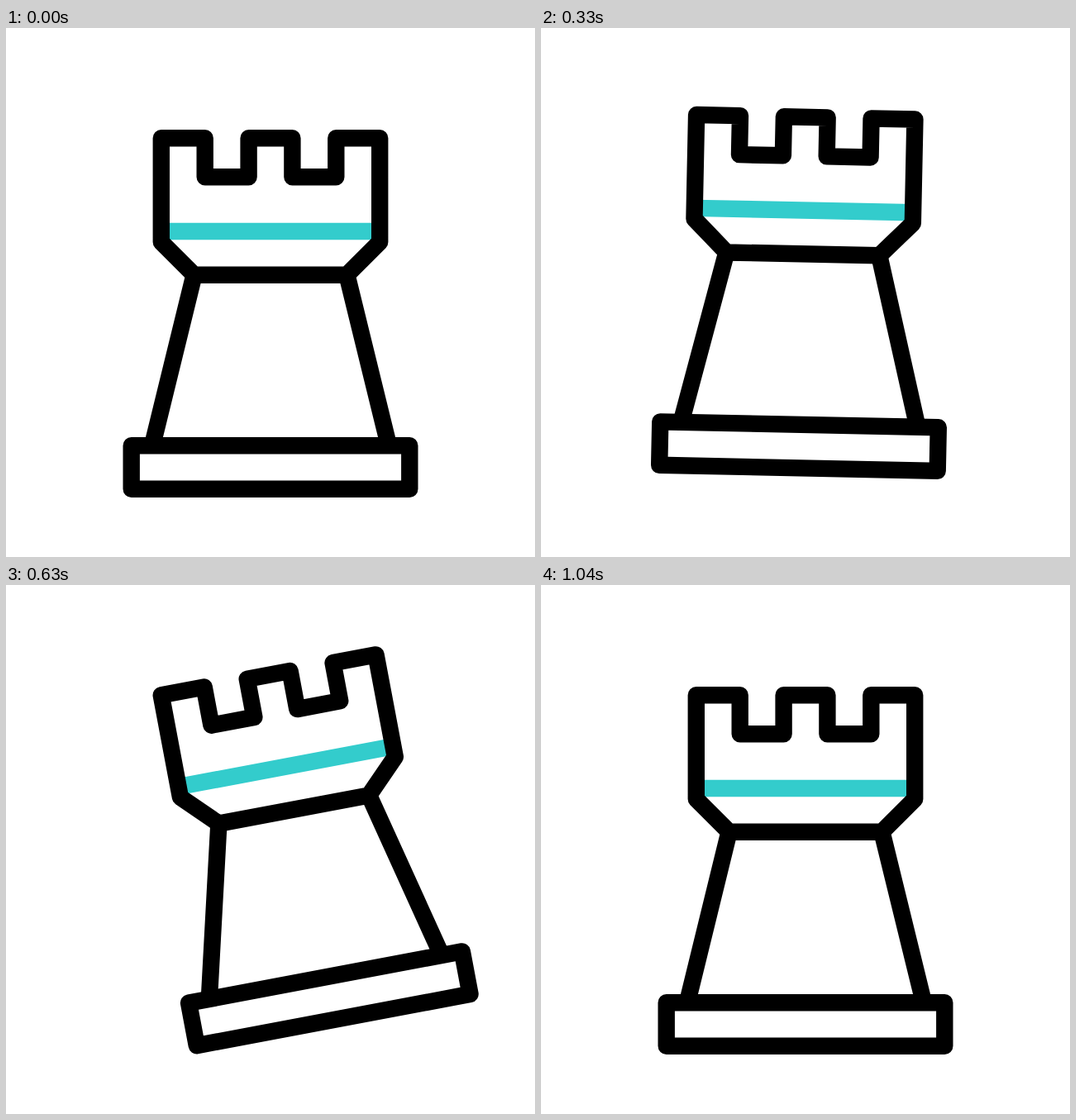
Animation of 640x640 px, one loop 1540 ms. Source, as an HTML page:

```html
<!DOCTYPE html>
<html lang="en">
<head>
<meta charset="utf-8">
<title>Rocking rook</title>
<style>
  html, body { margin: 0; width: 100%; height: 100%; overflow: hidden; background: #fff; }
  svg { display: block; width: 100%; height: 100%; }
</style>
</head>
<body>
<svg viewBox="0 0 640 640">
  <g id="rook" fill="none" stroke="#000" stroke-width="20.4" stroke-linejoin="round">
    <path d="M188 246H452" stroke="#3cc"/>
    <path d="M227.5 299L177 505M412.5 299L463 505"/>
    <path d="M187.8 133.2H240.7V180.2H293.6V133.2H346.4V180.2H399.3V133.2H452.2V259L412.4 298.8H227.6L187.8 259Z"/>
    <path d="M151.7 505.3H488.3V557.8H151.7Z"/>
  </g>
</svg>
<script>
  const LOOP = 1540, LAST = 25;
  const rook = document.getElementById('rook');

  // Poses at 24 steps per second; ease leads from each pose to the next.
  const poses = [
    { at: 0, angle: 0, lift: 0, ease: [1 / 6, 1 / 6, 0.5, 1] },
    { at: 4, angle: 9, lift: 25.4, ease: [0.5, 0, 0.5, 1] },
    { at: 13, angle: -11, lift: 25.4, ease: [0.5, 0, 5 / 6, 5 / 6] },
    { at: LAST, angle: 0, lift: 0 }
  ];

  const cubic = (a, b, s) => 3 * (1 - s) * (1 - s) * s * a + 3 * (1 - s) * s * s * b + s * s * s;

  function bezierEase([x1, y1, x2, y2], u) {
    let lo = 0, hi = 1;
    for (let i = 0; i < 30; i++) {
      const mid = (lo + hi) / 2;
      if (cubic(x1, x2, mid) < u) lo = mid; else hi = mid;
    }
    return cubic(y1, y2, (lo + hi) / 2);
  }

  // Step starts are rounded to whole hundredths of a second.
  const stepAt = ms => Math.min(LAST, Math.ceil((Math.floor(ms / 10) + 0.5) * 6 / 25) - 1);

  function draw(ms) {
    const step = stepAt(ms);
    const i = Math.max(1, poses.findIndex(p => p.at >= step));
    const a = poses[i - 1], b = poses[i];
    const k = step === b.at ? 1 : step === a.at ? 0 : bezierEase(a.ease, (step - a.at) / (b.at - a.at));
    const mix = key => a[key] + (b[key] - a[key]) * k;
    rook.setAttribute('transform', `translate(0 ${-mix('lift')}) rotate(${mix('angle')} 320 146)`);
  }

  const start = performance.now();
  function tick() {
    draw((performance.now() - start) % LOOP);
    requestAnimationFrame(tick);
  }
  tick();
</script>
</body>
</html>
```
